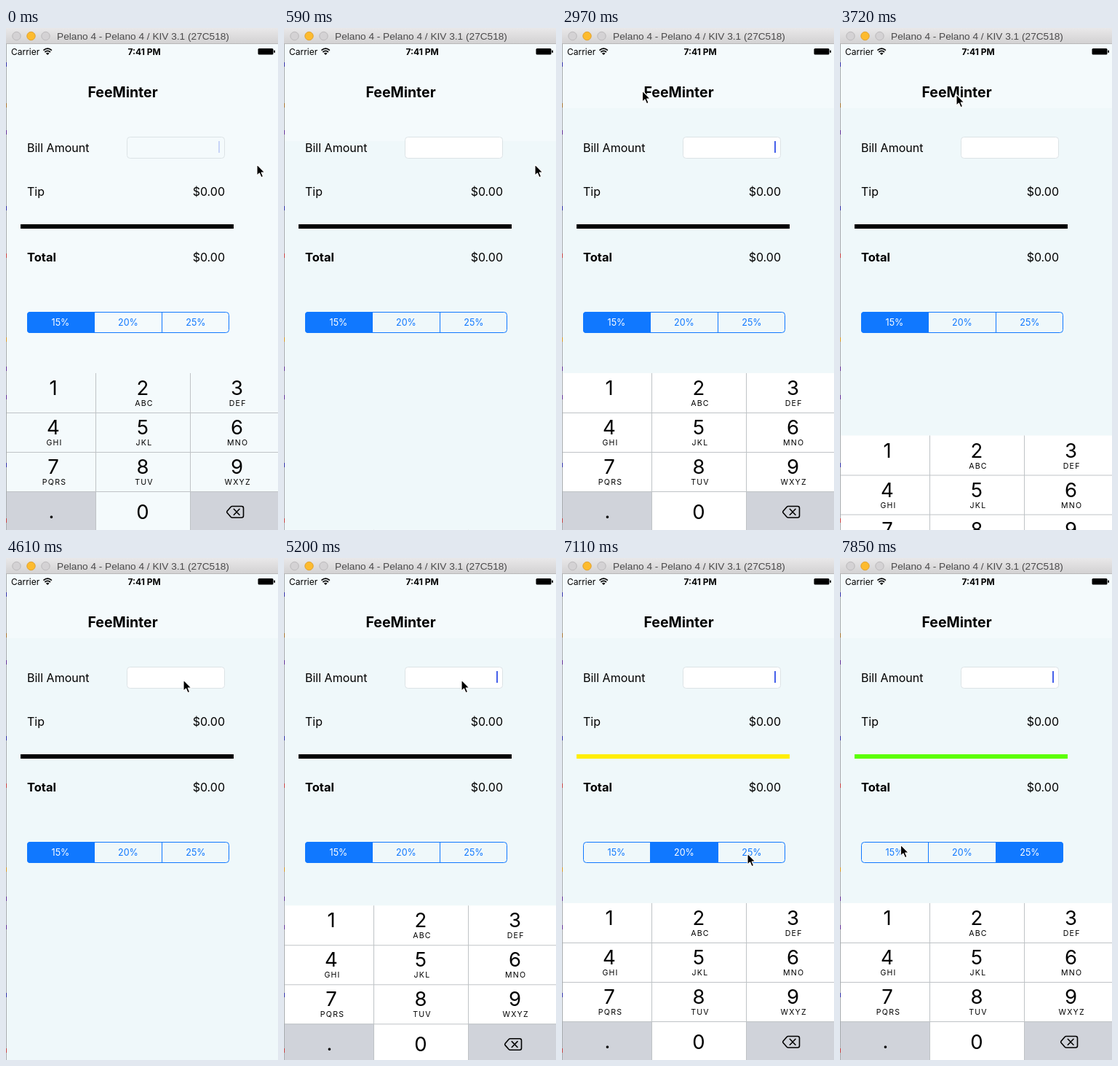
An HTML page that plays this animation: 374 px wide and 688 px high, repeating every 8 s.

```html
<!DOCTYPE html>
<html lang="en">
<head>
<meta charset="utf-8">
<title>Tip calculator</title>
<style>
html, body { margin: 0; width: 100%; height: 100%; overflow: hidden; background: #f4fafc; }
svg { display: block; width: 374px; height: 688px; font-family: Inter, Roboto, "Liberation Sans", sans-serif; }
.bar { font: 13.67px "Liberation Sans", Arial, sans-serif; fill: #4b4a4b; }
.status { font-size: 12px; }
.label { font-size: 16px; }
.bold { font-weight: 700; }
.head { font-size: 19.5px; font-weight: 700; }
.digit { font-size: 27.5px; }
.sub { font-size: 10.6px; letter-spacing: 1.2px; }
.seg { font-size: 12.5px; }
.mid { text-anchor: middle; }
.end { text-anchor: end; }
</style>
</head>
<body>
<svg id="stage" viewBox="0 0 374 688" xmlns="http://www.w3.org/2000/svg"></svg>
<script>
const LOOP = 8000, STEPS = 54, STEP_MS = 148.6;
const BLUE = '#1078ff', PALE = '#f4fafc', KEY_H = 215;
const stage = document.getElementById('stage');

function add(parent, tag, attrs, text) {
  const el = document.createElementNS(stage.namespaceURI, tag);
  for (const name in attrs) el.setAttribute(name, attrs[name]);
  if (text) el.textContent = text;
  parent.append(el);
  return el;
}
const rect = (p, x, y, width, height, fill, more) =>
  add(p, 'rect', { x, y, width, height, fill, ...more });
const text = (p, x, y, cls, str) => add(p, 'text', { x, y, class: cls }, str);
const path = (p, d, more) => add(p, 'path', { d, fill: 'none', stroke: '#000', ...more });

// App background
rect(stage, 0, 0, 374, 688, PALE);
const shade = rect(stage, 0, 155, 374, 533, '#eff8fa');

// Status bar
text(stage, 7, 36.5, 'status', 'Carrier');
path(stage, 'M51.5 30.6Q57.2 25.6 62.9 30.6M53.4 33Q57.2 29.6 61 33', { 'stroke-width': 1.7 });
path(stage, 'M57.2 37L54.9 34.7Q57.2 32.8 59.5 34.7Z', { fill: '#000', stroke: 'none' });
text(stage, 190, 36.5, 'status bold mid', '7:41 PM');
rect(stage, 346.5, 28, 21, 8.5, '#000', { rx: 1.5 });
rect(stage, 368.3, 30.5, 1.7, 3.5, '#000', { rx: 0.7 });

// Form
text(stage, 160.5, 94.5, 'head mid', 'FeeMinter');
text(stage, 29, 169.5, 'label', 'Bill Amount');
text(stage, 29, 229.5, 'label', 'Tip');
text(stage, 29, 320, 'label bold', 'Total').style.fontSize = '16.5px';
text(stage, 301, 229.5, 'label end', '$0.00');
text(stage, 301, 319.5, 'label end', '$0.00');
const field = rect(stage, 166.5, 149.5, 134, 29, '#fff', { rx: 4, stroke: '#dce3e6' });
const caret = rect(stage, 292, 155, 2, 16, '#4560ea');
const rule = rect(stage, 20, 269, 293, 6, '#000');

// Segmented control
const clip = add(add(stage, 'defs', {}), 'clipPath', { id: 'round' });
rect(clip, 29, 389, 278, 29, '#000', { rx: 4 });
const chosen = rect(add(stage, 'g', { 'clip-path': 'url(#round)' }), 29, 389, 93, 29, BLUE);
rect(stage, 29.5, 389.5, 277, 28, 'none', { rx: 4, stroke: BLUE });
path(stage, 'M121.5 389V418M214.5 389V418', { stroke: BLUE });
const options = ['15%', '20%', '25%'].map((s, i) => text(stage, 75 + 93 * i, 408.3, 'seg mid', s));
const ruleColors = ['#000', '#ffee00', '#5cff00'];

// Number pad
const pad = add(stage, 'g', {});
const padBack = rect(pad, 1, 473, 373, KEY_H, '#fff');
rect(pad, 1, 635, 122, 53, '#d0d3da');
rect(pad, 254, 635, 120, 53, '#d0d3da');
path(pad, 'M1 527.5H374M1 581.5H374M1 635.5H374M123.5 473V688M253.5 473V688', { stroke: '#bfc3c6' });
['', 'ABC', 'DEF', 'GHI', 'JKL', 'MNO', 'PQRS', 'TUV', 'WXYZ'].forEach((letters, i) => {
  const col = i % 3, y = 503 + 54 * Math.floor(i / 3);
  text(pad, [65, 188, 317.5][col], y, 'digit mid', String(i + 1));
  text(pad, [66.5, 190, 318.7][col], y + 15, 'sub mid', letters);
});
text(pad, 62.5, 672, 'digit mid', '.');
text(pad, 188, 672.5, 'digit mid', '0');
path(pad, 'M311 655.5H324Q326.5 655.5 326.5 658V668.5Q326.5 671 324 671H311Q310 671 309 670L304 664.3Q303.3 663.3 304 662.3L309 656.5Q310 655.5 311 655.5ZM313.3 659.3L321 667.2M321 659.3L313.3 667.2',
  { 'stroke-width': 1.6, 'stroke-linejoin': 'round', 'stroke-linecap': 'round' });

// Window frame
const grad = add(stage, 'linearGradient', { id: 'chrome', x2: 0, y2: 1 });
add(grad, 'stop', { offset: 0, 'stop-color': '#e9e8e9' });
add(grad, 'stop', { offset: 1, 'stop-color': '#d2d1d2' });
rect(stage, 0, 0, 374, 22, 'url(#chrome)');
rect(stage, 0, 21, 374, 1, '#b9b8b9');
[['#d4d2d4', '#bbb9bb'], ['#fdbb2e', '#e0a02c'], ['#d4d2d4', '#bbb9bb']].forEach(([fill, stroke], i) =>
  add(stage, 'circle', { cx: 14.5 + 20 * i, cy: 11, r: 5.7, fill, stroke }));
text(stage, 188.5, 15.8, 'bar mid', 'Pelano 4 - Pelano 4 / KIV 3.1 (27C518)');
rect(stage, 0, 22, 1, 666, '#a9adb0');
[[47, '#33a'], [103, '#a73'], [140, '#639'], [244, '#33a'], [309, '#c44'], [424, '#d92'],
 [464, '#639'], [503, '#639'], [596, '#33a'], [672, '#c44']]
  .forEach(([y, color]) => rect(stage, 0, y, 1, 6, color));

// Pointer
const pointer = path(stage, 'M0 0V15.2L3.5 12L6 17.7L8.6 16.6L6.2 11H10.9Z',
  { fill: '#000', stroke: '#fff', 'stroke-width': 1.1, 'stroke-linejoin': 'round' });

// step, x, y
const route = [
  [0, 345, 187], [5, 345, 187], [6, 318, 160], [7, 222, 131], [8, 240, 160], [9, 255.5, 167],
  [17, 255.5, 167], [18, 218, 140], [19, 142, 102], [20, 110.5, 86], [21, 135, 90], [22, 160, 91],
  [27, 160, 91], [29, 212, 130], [31, 244, 167], [36, 244, 167], [37, 232, 200], [38, 195, 320],
  [39, 160, 415], [40, 150, 441], [41, 172.5, 400], [45, 172.5, 400], [47, 245, 405], [48, 255, 405],
  [50, 255, 405], [51, 215, 406], [52, 130, 402], [53, 83.5, 393]
];
// start time and whether the pad opens
const toggles = [[70, false], [1545, true], [3640, false], [4865, true]];

function pointerAt(step) {
  const i = Math.max(1, route.findIndex(p => p[0] >= step));
  const [s0, x0, y0] = route[i - 1], [s1, x1, y1] = route[i];
  const f = (step - s0) / (s1 - s0);
  return [x0 + (x1 - x0) * f, y0 + (y1 - y0) * f];
}

// Critically damped spring: the share of the travel still to go
function remaining(ms) {
  const u = 0.01826 * ms;
  return (1 + u) * Math.exp(-u);
}

function blink(ms) {
  const p = ms % 1000 / 1000;
  if (p < 0.5) return 1;
  if (p < 0.75) return Math.min(1, (0.75 - p) / 0.25 * 0.85);
  return Math.max(0, (p - 0.965) / 0.05);
}

function draw(step) {
  const time = step * STEP_MS;
  const last = toggles.filter(t => t[0] <= time).pop();
  let offset = 0, glow = 0.25;
  if (last) {
    const [start, opens] = last, rest = remaining(time - start);
    offset = KEY_H * (opens ? rest : 1 - rest);
    glow = opens ? blink(time - start) : 0;
  }
  pad.setAttribute('transform', `translate(0 ${offset.toFixed(1)})`);
  caret.setAttribute('opacity', glow);

  const first = step < 1;
  shade.setAttribute('opacity', first ? 0 : 1);
  shade.setAttribute('y', step < 20 ? 155 : 110);
  shade.setAttribute('height', step < 20 ? 533 : 578);
  field.setAttribute('fill', first ? PALE : '#fff');
  padBack.setAttribute('fill', first ? PALE : '#fff');

  const pick = step < 45 ? 0 : step < 49 ? 1 : 2;
  chosen.setAttribute('x', [29, 122, 214][pick]);
  rule.setAttribute('fill', ruleColors[pick]);
  options.forEach((o, i) => o.setAttribute('fill', i === pick ? '#fff' : BLUE));

  pointer.setAttribute('transform', `translate(${pointerAt(step)})`);
}

const begin = performance.now();
function tick() {
  const t = (performance.now() - begin) % LOOP;
  draw(Math.min(STEPS - 1, Math.floor((t + 8) * STEPS / LOOP)));
  requestAnimationFrame(tick);
}
tick();
</script>
</body>
</html>
```
